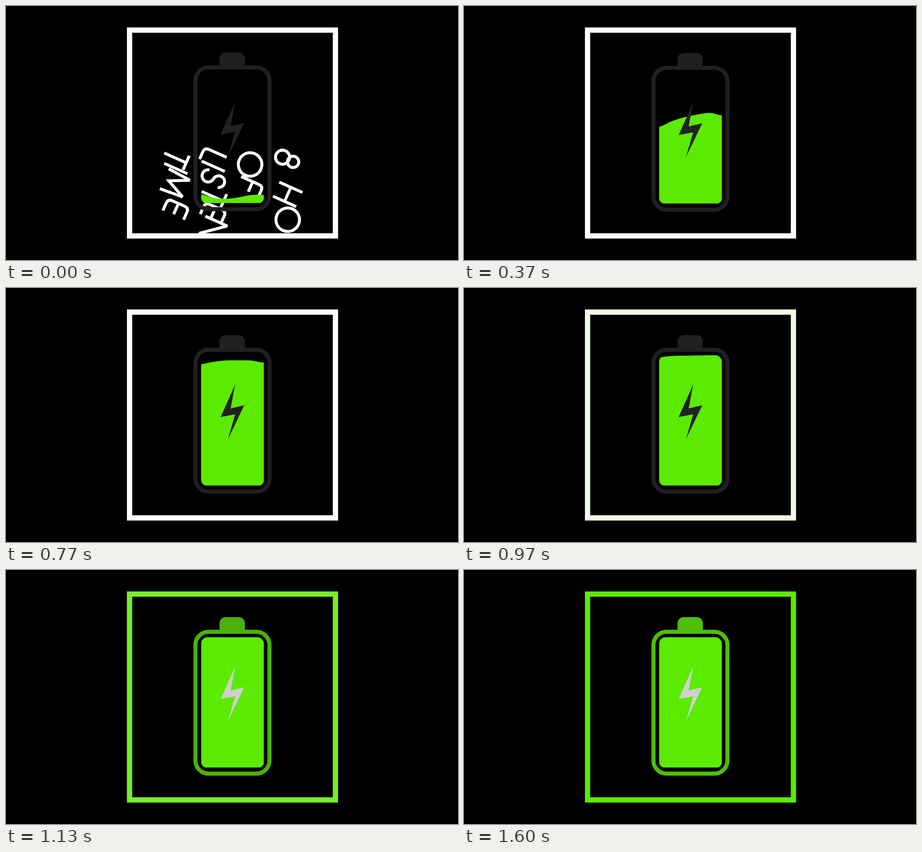
These frames come from a looping animation (998x561 px, 1.63 s). An HTML page with a canvas:

```html
<!DOCTYPE html>
<html lang="en">
<head>
<meta charset="utf-8">
<title>Battery charging</title>
<style>
  html, body { margin: 0; width: 100%; height: 100%; overflow: hidden; background: #000; }
  canvas { display: block; }
</style>
</head>
<body>
<canvas id="stage" width="998" height="561" role="img" aria-label="8 hours of listening time"></canvas>
<script>
const ctx = document.getElementById('stage').getContext('2d');
const LOOP = 1630;
const GREEN = [91, 234, 0], DARK = [33, 32, 33], WHITE = [255, 255, 252];

// Thin rounded lettering, cap height 56, centred on the origin.
const glyphs = {
  '8': 'M15.5 12.5A15.5 15.5 0 1 1 -15.5 12.5A15.5 15.5 0 1 1 15.5 12.5ZM12.5 -13A12.5 12.5 0 1 1 -12.5 -13A12.5 12.5 0 1 1 12.5 -13Z',
  O: 'M26 0A26 26 0 1 1 -26 0A26 26 0 1 1 26 0Z',
  H: 'M-17 -28V28M17 -28V28M-17 0H17',
  F: 'M-14 28V-15Q-14 -25 -4 -25H14M-14 0H10',
  L: 'M-10 -28V15Q-10 25 0 25H18',
  I: 'M0 -28V28',
  S: 'M14 -17A13 13 0 1 0 0 -1A13.5 13.5 0 1 1 -14 15',
  T: 'M0 28V-25M-17 -25H17',
  E: 'M14 -25H-4Q-14 -25 -14 -15V15Q-14 25 -4 25H14M-14 0H12',
  N: 'M-20 28V-25L20 25V-28',
  M: 'M-24 28L-20 -25L0 17L20 -25L24 28'
};
for (const key in glyphs) glyphs[key] = new Path2D(glyphs[key]);

const columns = [
  { text: '8HO', x: 622, y: [339, 416, 472] },
  { text: 'OF', x: 539, y: [350, 401] },
  { text: 'LISTEN', x: 457.5, y: [332, 354, 381, 421, 457, 494] },
  { text: 'TIME', x: 375, y: [336, 359, 393, 449] }
];

const bolt = new Path2D('M506 213L474 285L506 279L490 334L526 259L496 266Z');

// Liquid surface heights, left to right, at key times.
const surfaceTimes = [0, 200, 530, 970, 1130];
const surface = [
  [417, 425, 427, 423.5, 418.5, 418],
  [347, 333.5, 324, 314, 304.5, 305],
  [204, 196, 190, 189, 190, 199],
  [153, 150, 149.5, 149, 148, 148],
  [147, 147, 147, 147, 147, 147]
];

const clamp = (v, lo = 0, hi = 1) => Math.min(hi, Math.max(lo, v));
const rgb = c => `rgb(${c.map(Math.round).join()})`;
const mix = (a, b, k) => a.map((v, i) => v + (b[i] - v) * k);

function segment(times, t) {
  let i = 0;
  while (i < times.length - 2 && t >= times[i + 1]) i++;
  return [i, clamp((t - times[i]) / (times[i + 1] - times[i]))];
}

function ramp(times, values, t) {
  const [i, u] = segment(times, t);
  return values[i] + (values[i + 1] - values[i]) * u;
}

function surfaceHeights(t) {
  const times = surfaceTimes, last = times.length - 1;
  const [i, u] = segment(times, t);
  const span = times[i + 1] - times[i];
  return surface[0].map((_, p) => {
    const slope = k => {
      const a = Math.max(0, k - 1), b = Math.min(last, k + 1);
      return (surface[b][p] - surface[a][p]) / (times[b] - times[a]);
    };
    const from = surface[i][p], to = surface[i + 1][p], w = 1 - u;
    return from * (1 + 2 * u) * w * w + to * u * u * (3 - 2 * u)
      + span * (slope(i) * u * w * w - slope(i + 1) * u * u * w);
  });
}

function drawText(t) {
  const s = t / 1000;
  const fall = 550 * s + 500 * s * s;
  const angle = (90 + 24 + 42 * s) * Math.PI / 180;
  ctx.save();
  ctx.beginPath();
  ctx.rect(278, 59, 444, 443);
  ctx.clip();
  ctx.strokeStyle = '#fff';
  ctx.lineWidth = 6.5;
  ctx.lineJoin = 'miter';
  ctx.miterLimit = 3;
  for (const { text, x, y } of columns) {
    [...text].forEach((letter, i) => {
      ctx.save();
      ctx.translate(x - 7 * s, y[i] + fall);
      ctx.rotate(angle);
      ctx.stroke(glyphs[letter]);
      ctx.restore();
    });
  }
  ctx.restore();
}

function drawLiquid(t) {
  const left = 431, right = 569.5, bottom = 436.5;
  const ys = surfaceHeights(t), step = (right - left) / (ys.length - 1);
  const xAt = i => left + i * step;
  ctx.save();
  ctx.beginPath();
  ctx.roundRect(left, 148.5, right - left, bottom - 148.5, [14, 15, 12, 12]);
  ctx.clip();
  ctx.fillStyle = rgb(GREEN);
  ctx.beginPath();
  ctx.moveTo(left, bottom);
  ctx.lineTo(left, ys[0]);
  for (let i = 0; i < ys.length - 1; i++) {
    const before = ys[Math.max(0, i - 1)], after = ys[Math.min(ys.length - 1, i + 2)];
    ctx.bezierCurveTo(
      xAt(i) + step / 3, ys[i] + (ys[i + 1] - before) / 6,
      xAt(i + 1) - step / 3, ys[i + 1] - (after - ys[i]) / 6,
      xAt(i + 1), ys[i + 1]);
  }
  ctx.lineTo(right, bottom);
  ctx.fill();

  // Air pocket sloshing against the right wall.
  const pocket = 10.5 * clamp(1 - Math.abs(t - 530) / 140);
  if (pocket > 0) {
    ctx.fillStyle = '#000';
    ctx.beginPath();
    ctx.moveTo(right + 1, 234);
    ctx.bezierCurveTo(right - pocket * 0.5, 251, right - pocket, 258, right - pocket, 273);
    ctx.bezierCurveTo(right - pocket, 285, right - pocket * 0.4, 295, right + 1, 309);
    ctx.fill();
  }
  ctx.restore();
}

function drawBattery(t) {
  const glow = ramp([985, 1130, 1230, 1400, 1600], [0, 0.72, 1, 1, 0.78], t);
  const flash = ramp([985, 1130, 1330, 1600], [34, 207, 230, 208], t);
  ctx.save();
  ctx.translate(0, -clamp(1 - t / 100));
  drawLiquid(t);
  const color = rgb(mix(DARK, GREEN, glow));
  ctx.strokeStyle = ctx.fillStyle = color;
  ctx.lineWidth = 9;
  ctx.beginPath();
  ctx.roundRect(418.3, 136.5, 163.4, 313.3, 29);
  ctx.stroke();
  ctx.beginPath();
  ctx.roundRect(471.5, 104, 56, 29, [14, 14, 0, 0]);
  ctx.fill();
  ctx.fillStyle = rgb([flash, flash, flash]);
  ctx.fill(bolt);
  ctx.restore();
}

function drawFrame(t) {
  ctx.strokeStyle = rgb(mix(WHITE, GREEN, ramp([948, 1167], [0, 1], t)));
  ctx.lineWidth = 11.6;
  ctx.lineJoin = 'miter';
  ctx.miterLimit = 10;
  ctx.strokeRect(272.8, 53.2, 454.6, 454.6);
}

function render(now) {
  const t = now % LOOP;
  ctx.fillStyle = '#000';
  ctx.fillRect(0, 0, 998, 561);
  if (t < 500) drawText(t);
  drawBattery(t);
  drawFrame(t);
}

let start = null;
function tick(now) {
  if (start === null) start = now;
  render(Math.max(0, now - start));
  requestAnimationFrame(tick);
}
render(0);
requestAnimationFrame(tick);
</script>
</body>
</html>
```
